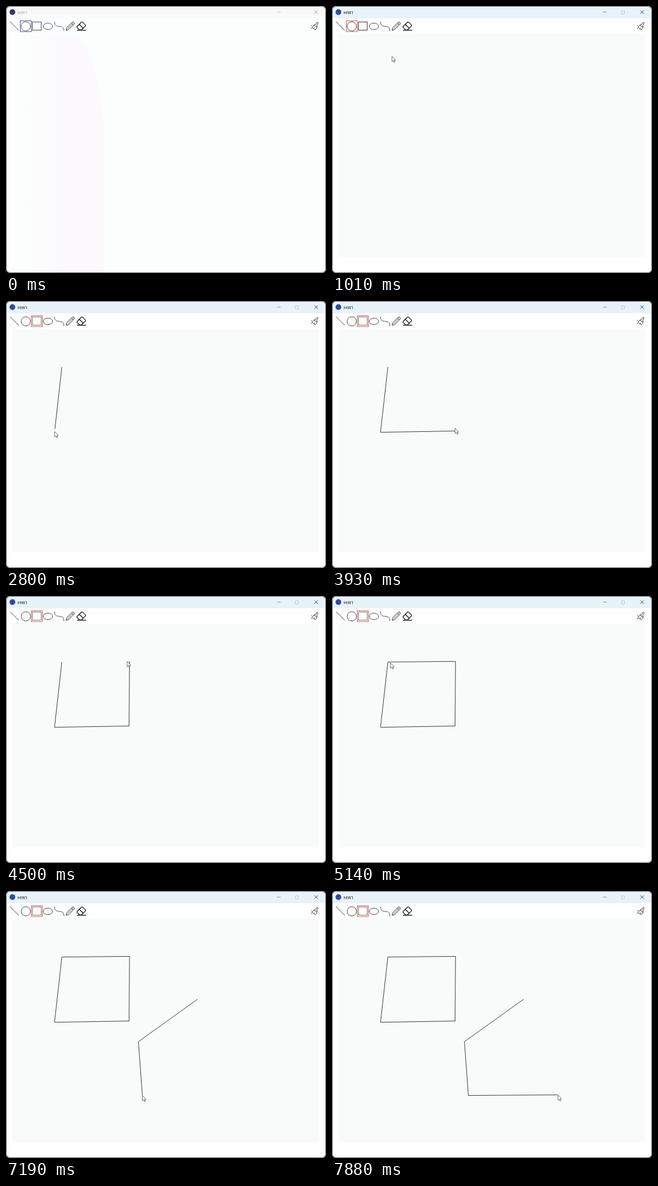
Write an HTML page with a canvas that moves like this. It is 550x459 px and loops after 8000 ms.

```html
<!DOCTYPE html>
<html lang="en">
<head>
<meta charset="utf-8">
<title>Paint window</title>
<style>
  html, body { margin: 0; width: 100%; height: 100%; overflow: hidden; background: #000; }
  canvas { display: block; width: 550px; height: 459px; }
</style>
</head>
<body>
<canvas id="stage" width="550" height="459"></canvas>
<script>
const ctx = document.getElementById('stage').getContext('2d');
const LOOP = 8000, WAKE = 650, PICK = 1400, LAG = 22;

const A = [96, 113.5], B = [83.4, 225.7], C = [211.5, 223.5], D = [212.3, 112.4];
const E = [329.3, 186], F = [227.6, 259], G = [234.4, 351.5], H = [388.3, 350.5];

// Pointer moves: start, end, from, to
const moves = [
  [650, 1320, [165, 150], [54, 36]],
  [1480, 1900, [54, 36], [93, 183]],
  [2020, 2200, [93, 183], A],
  [2520, 2820, A, B],
  [3240, 3610, B, C],
  [3890, 4210, C, D],
  [4460, 4820, D, A],
  [4860, 4970, A, [100.5, 115]],
  [5310, 5910, [100.5, 115], E],
  [6070, 6490, E, F],
  [6840, 7180, F, G],
  [7490, 7880, G, H]
];
// Indices of the moves that draw an edge
const drawn = [3, 4, 5, 6, 9, 10, 11];

const clamp = v => Math.min(1, Math.max(0, v));
const ease = v => v * v * (3 - 2 * v);

function along([start, end, from, to], t) {
  const k = ease(clamp((t - start) / (end - start)));
  return from.map((v, i) => v + (to[i] - v) * k);
}

function pointerAt(t) {
  let m = moves[0];
  for (const next of moves) if (t >= next[0]) m = next;
  return along(m, t);
}

function stroke(d, color, width = 1) {
  ctx.strokeStyle = color;
  ctx.lineWidth = width;
  ctx.stroke(new Path2D(d));
}

function frame(x, y, w, h, color) {
  ctx.strokeStyle = color;
  ctx.lineWidth = 1;
  ctx.strokeRect(x + 0.5, y + 0.5, w, h);
}

function oval(x, y, rx, ry, color) {
  ctx.beginPath();
  ctx.ellipse(x, y, rx, ry, 0, 0, Math.PI * 2);
  ctx.strokeStyle = color;
  ctx.lineWidth = 0.9;
  ctx.stroke();
}

function panel(x, y, w, h, r) {
  ctx.beginPath();
  ctx.roundRect(x, y, w, h, r);
}

function haze() {
  const g = ctx.createLinearGradient(25, 0, 170, 0);
  g.addColorStop(0, '#fcfafd00');
  g.addColorStop(0.5, '#fcfafd');
  g.addColorStop(1, '#fcfafd');
  ctx.fillStyle = g;
  ctx.fill(new Path2D('M25 50H120C155 90 169 150 169 270V458H25Z'));
}

function titleBar(awake) {
  if (awake) {
    ctx.fillStyle = '#e7f3f9';
  } else {
    const g = ctx.createLinearGradient(0, 0, 0, 24);
    g.addColorStop(0, '#f6f6f7');
    g.addColorStop(0.6, '#f9f9fa');
    g.addColorStop(1, '#fcfdfd');
    ctx.fillStyle = g;
  }
  ctx.fillRect(0, 0, 550, awake ? 21 : 24);

  ctx.fillStyle = awake ? '#2f4aa6' : '#35347c';
  ctx.beginPath();
  ctx.arc(11, 10.5, 4.9, 0, Math.PI * 2);
  ctx.fill();

  ctx.fillStyle = awake ? '#1c1c1c' : '#a9a9b2';
  ctx.font = '8px Roboto, "Open Sans", sans-serif';
  ctx.fillText('HW1', 20, 13.6);

  stroke('M465.5 10.5H472', awake ? '#8d979c' : '#c4c4c8');
  if (awake) frame(497, 8, 5, 5, '#c0cbd1');
  stroke('M530 7.5L536 13.5M536 7.5L530 13.5', awake ? '#3c4245' : '#a0a0a6');
}

function tools(awake, picked) {
  const ink = awake ? '#3a3a3a' : '#4a4878';
  stroke('M6.8 26.8L22 42', ink, 0.9);
  oval(34, 35, 8, 8, ink);
  frame(45, 27, 15, 14, picked ? '#8d7672' : ink);
  oval(72, 35, 8, 5.6, ink);
  stroke('M83.5 27C83.5 34 87 34.5 91 35C97 35.5 99.5 37 99.5 43', ink, 0.9);

  if (picked) frame(43, 25, 19, 18.5, '#c0625b');
  else frame(24, 25, 19, 18.5, awake ? '#c0625b' : '#55527f');

  ctx.lineJoin = 'round';
  // pencil
  stroke('M103.3 41.7L104.4 37.4L113.9 27.9Q115.2 26.8 116.7 28.2Q118.1 29.7 117 31.1L107.6 40.6Z', '#222', 1);
  stroke('M106 39L115.5 29.5M112.4 29.4L115.5 32.5', '#333', 0.8);
  // eraser
  stroke('M126.3 41L122.2 36.9Q121.5 36 122.2 35.2L129.8 27.7Q130.7 27 131.5 27.7L136.5 32.7Q137.3 33.6 136.5 34.4L129.9 41Z', '#111', 1.2);
  stroke('M126 31.5L132.8 38.2M122 41.6H137.8', '#111', 1.2);
  // broom
  stroke('M535.3 28Q537 28.4 536.2 29.8L534 33.6Q535.6 35 534.6 36.4L529.2 32.9Q529.8 31.2 531.8 32.2L534 28.6Z', '#222', 0.9);
  stroke('M529.2 32.9Q528.2 35 525.8 36.2Q528.5 39.8 532 40.6Q534 38.8 534.6 36.4M529.4 38.6L530.6 37M524.6 33.4L526 34M524.4 38.6L526 38.2', '#222', 0.9);
  ctx.lineJoin = 'miter';
}

function drawing(t) {
  for (const i of drawn) {
    const m = moves[i];
    if (t > m[0]) stroke(`M${m[2]}L${along(m, t - LAG)}`, '#1a1a1a', 0.85);
  }
}

function pointer([x, y]) {
  ctx.save();
  ctx.translate(x, y);
  const d = 'M0 0V9.3L2.2 7.4L3.7 10.6L5.1 10L3.7 6.9H6.4Z';
  ctx.fillStyle = '#fff';
  ctx.fill(new Path2D(d));
  stroke(d, '#4a4d52', 0.8);
  ctx.restore();
}

function render(t) {
  const awake = t >= WAKE, picked = t >= PICK;
  ctx.fillStyle = '#000';
  ctx.fillRect(0, 0, 550, 459);

  ctx.save();
  panel(0, 0, 550, 459, 7);
  ctx.clip();
  ctx.fillStyle = awake ? '#fefefe' : '#fcfdfd';
  ctx.fillRect(0, 0, 550, 459);
  if (awake) {
    ctx.fillStyle = '#f9fafa';
    ctx.fillRect(11, 48, 527, 384);
  } else {
    haze();
  }
  titleBar(awake);
  tools(awake, picked);
  drawing(t);
  if (awake) pointer(pointerAt(t));
  ctx.restore();

  panel(0.5, 0.5, 549, 458, 7);
  ctx.strokeStyle = '#55585a';
  ctx.lineWidth = 1;
  ctx.stroke();
}

const begin = performance.now();
function tick() {
  render((performance.now() - begin) % LOOP);
  requestAnimationFrame(tick);
}
tick();
</script>
</body>
</html>
```
